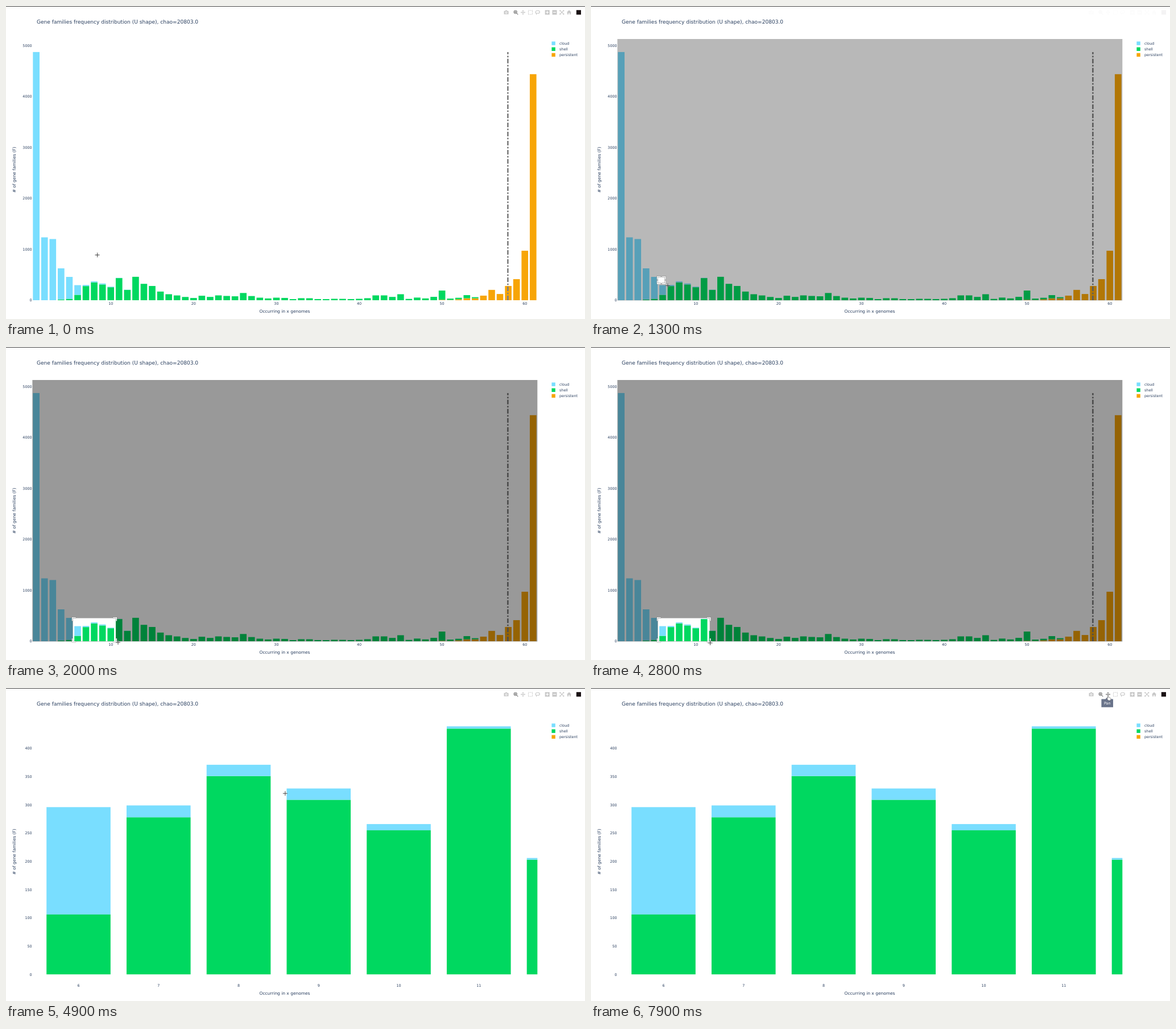
Write an HTML page with a canvas that moves like this. It is 1018 px wide and 550 px high and loops after 8000 ms.

```html
<!DOCTYPE html>
<html lang="en">
<head>
<meta charset="utf-8">
<title>Gene families frequency</title>
<style>
html, body { margin: 0; width: 100%; height: 100%; overflow: hidden; background: #fff; }
canvas { display: block; }
</style>
</head>
<body>
<canvas id="stage" width="1018" height="550"></canvas>
<script>
const ctx = document.getElementById('stage').getContext('2d');
const LOOP = 8000, STEP = 100;
const UNIT = 0.5335; // chart pixels to stage pixels
const INK = '#2a3f5f', SANS = '"DejaVu Sans", sans-serif', ARIAL = '"Liberation Sans", Arial, sans-serif';
const COLORS = { cloud: '#79deff', shell: '#00d860', persistent: '#f7a507' };
const PLOT = { l: 46.4, t: 58, r: 934.3, b: 517 };

const totals = [4875, 1235, 1202, 626, 458, 296, 299, 371, 329, 266, 439, 206, 460, 322, 280, 170,
  118, 94, 64, 44, 88, 65, 95, 84, 77, 142, 82, 50, 35, 50, 45, 22, 40, 39, 23, 22, 28, 27, 23, 28,
  40, 95, 95, 65, 118, 26, 52, 36, 66, 190, 32, 48, 100, 60, 90, 203, 122, 280, 414, 972, 4440];
const lowShell = [0, 0, 0, 15, 28, 106, 278, 351, 309, 255, 435, 203];
const lowPersistent = [8, 5, 18, 38, 38];

const bars = totals.map((total, i) => {
  const persistent = i < 49 ? 0 : lowPersistent[i - 49] ?? total;
  return { x: i + 1, persistent, total, shellTop: lowShell[i] ?? total };
});

const makeView = (x0, dx, y0, dy, xTicks, yTicks) =>
  ({ X: v => x0 + v * dx, Y: v => y0 - v * dy, dx, xTicks, yTicks });
const range = (from, to, step) => Array.from({ length: (to - from) / step + 1 }, (_, i) => from + i * step);
const fullView = makeView(38.6, 14.56, 517, 0.08946, range(10, 60, 10), range(0, 5000, 1000));
const zoomView = makeView(-717, 140.75, 503.2, 0.9928, range(6, 11, 1), range(0, 400, 50));

// Pointer path: time, x, y
const path = [
  [0, 160.5, 437.5], [600, 122.5, 477], [700, 122.5, 477], [1000, 118, 476.3], [1100, 118, 476.3],
  [1200, 123, 481], [1300, 135, 491.5], [1400, 146, 501], [2000, 197, 519], [2400, 204, 522],
  [2500, 204, 522], [2800, 209.5, 520], [3800, 209.5, 520], [4400, 428, 206], [4800, 428, 206],
  [5600, 931, 40], [5700, 925.5, 28.5], [6100, 920.5, 25.5], [6300, 920.5, 25.5],
  [7100, 878, 16], [7500, 878, 16], [7900, 909.5, 14]
];
function pointerAt(t) {
  const i = path.findIndex(p => p[0] > t);
  if (i < 0) return path.at(-1).slice(1);
  const [t0, x0, y0] = path[i - 1], [t1, x1, y1] = path[i], k = (t - t0) / (t1 - t0);
  return [x0 + (x1 - x0) * k, y0 + (y1 - y0) * k];
}

function text(str, x, y, size, align = 'left', color = INK, font = SANS) {
  ctx.font = `${size}px ${font}`;
  ctx.textAlign = align;
  ctx.fillStyle = color;
  ctx.fillText(str, x, y);
}
function rect(x, y, w, h, color) {
  ctx.fillStyle = color;
  ctx.fillRect(x, y, w, h);
}
function shape(d, fill, stroke, width = 1) {
  const p = new Path2D(d);
  ctx.lineWidth = width;
  if (stroke) { ctx.strokeStyle = stroke; ctx.stroke(p); }
  if (fill) { ctx.fillStyle = fill; ctx.fill(p, 'evenodd'); }
}
function at(x, y, draw) {
  ctx.save();
  ctx.translate(x, y);
  draw();
  ctx.restore();
}

function drawFrame(view) {
  rect(0, 0, 1018, 550, '#fff');
  rect(0, 0, 1018, 1, '#444');
  text('Gene families frequency distribution (U shape), chao=20803.0', 54, 31.2, 17 * UNIT);
  text('Occurring in x genomes', 490, 539.3, 14 * UNIT, 'center');
  at(16.6, 287.7, () => {
    ctx.rotate(-Math.PI / 2);
    text('# of gene families (F)', 0, 0, 14 * UNIT, 'center');
  });
  for (const v of view.xTicks) text(v, view.X(v), 525.2, 12 * UNIT, 'center');
  for (const v of view.yTicks) text(v, 45.6, view.Y(v) + 2.3, 12 * UNIT, 'right');
  Object.entries(COLORS).forEach(([name, color], i) => {
    const y = 65.6 + i * 10.15;
    rect(959.4, y - 3.2, 6.4, 6.4, color);
    text(name, 973, y + 2.3, 12 * UNIT);
  });
}

function drawBars(view) {
  const { X, Y, dx } = view, w = dx * 0.8;
  ctx.save();
  ctx.beginPath();
  ctx.rect(PLOT.l, PLOT.t, PLOT.r - PLOT.l, PLOT.b - PLOT.t);
  ctx.clip();
  for (const b of bars) {
    const part = (from, to, color) => to > from && rect(X(b.x) - w / 2, Y(to), w, Y(from) - Y(to), color);
    part(0, b.persistent, COLORS.persistent);
    part(b.persistent, b.shellTop, COLORS.shell);
    part(b.shellTop, b.total, COLORS.cloud);
  }
  const lw = 5 * UNIT;
  ctx.setLineDash([3 * lw, lw, lw, lw]);
  ctx.strokeStyle = '#808080';
  ctx.lineWidth = lw;
  ctx.beginPath();
  ctx.moveTo(X(57.95), Y(0));
  ctx.lineTo(X(57.95), Y(4875));
  ctx.stroke();
  ctx.restore();
}

function drawSelection(t) {
  const l = 117.7, top = 476.5;
  const [px, py] = pointerAt(t - 45);
  const r = Math.max(px, l + 2), b = Math.min(Math.max(py, top + 2), PLOT.b);
  ctx.beginPath();
  ctx.rect(PLOT.l, PLOT.t, PLOT.r - PLOT.l, PLOT.b - PLOT.t + 0.4);
  ctx.rect(l, top, r - l, b - top);
  ctx.fillStyle = `rgba(0,0,0,${Math.min(0.4, (t - 1160) / 500)})`;
  ctx.fill('evenodd');
  const arm = Math.min(20, (r - l) / UNIT, (b - top) / UNIT) / 2;
  for (const [x, y, sx, sy] of [[l, top, 1, 1], [r, top, -1, 1], [l, b, 1, -1], [r, b, -1, -1]]) {
    at(x, y, () => {
      ctx.scale(sx * UNIT, sy * UNIT);
      shape(`M-3.5 ${arm - 0.5}h3v${-arm}h${arm}v-3h${-arm - 3}z`, '#fff', '#444');
    });
  }
}

function drawHover(t, x, y) {
  const { X, Y, dx } = zoomView;
  const b = bars[t < 3900 ? 5 : Math.round((x - X(0)) / dx) - 1];
  if (!b) return;
  const away = Math.abs(x - X(b.x)) > dx * 0.4 || y < Y(b.total) || y > PLOT.b || x > PLOT.r;
  if (t >= 3900 && away) return;
  const name = t < 3900 || y > Y(b.shellTop) ? 'shell' : 'cloud';
  const value = name === 'shell' ? b.shellTop : b.total;
  const label = `(${b.x}, ${value})`, size = 13 * UNIT, pad = 3 * UNIT, arrow = 6 * UNIT;
  at(X(b.x) + dx * 0.4, Y(value), () => {
    ctx.font = `${size}px ${ARIAL}`;
    const w = ctx.measureText(label).width + 2 * pad, nw = ctx.measureText(name).width + 2 * pad;
    rect(arrow + w, -6, nw, 12, name === 'shell' ? '#ccf7df' : '#e4f8ff');
    shape(`M0 0L${arrow} -3.2V-6h${w}v12h${-w}v-2.8z`, COLORS[name], '#444', 0.8);
    text(label, arrow + pad, 2.4, size, 'left', '#444', ARIAL);
    text(name, arrow + w + pad, 2.4, size, 'left', COLORS[name], ARIAL);
  });
}

// Toolbar icons: x, filled path, stroked path, dash
const icons = [
  [879.5, 'M-4-2.4h2l1-1.2h2l1 1.2h2v5.6h-8zM0-1.6a2 2 0 100 4a2 2 0 100-4zM0-.7a1.1 1.1 0 100 2.2a1.1 1.1 0 100-2.2z'],
  [896.3, '', 'M2-.6a2.6 2.6 0 11-5.2 0a2.6 2.6 0 115.2 0zM1.4 1.4L4 4M-2-.6h2.8M-.6-2v2.8'],
  [909, 'M0-4.2l1.6 1.7h-3.2zM0 4.2l1.6-1.7h-3.2zM-4.2 0l1.7-1.6v3.2zM4.2 0l-1.7-1.6v3.2z', 'M-3 0h6M0-3v6'],
  [922, '', 'M-3.5-3.5h7v7h-7z', [1.6, 1.2]],
  [934.7, '', 'M-1.8 1.8C-5 .8-4-3.2 0-3.2S5 .6 1.2 1.6C-.5 2-1.5 1-2.3 2c-.5 1 .6 1 .2 2.2'],
  [951.7, 'M-4-4h8v8h-8zM-.6-2.5h1.2v1.9h1.9v1.2h-1.9v1.9h-1.2v-1.9h-1.9v-1.2h1.9z'],
  [964.5, 'M-4-4h8v8h-8zM-2.5-.6h5v1.2h-5z'],
  [977.3, 'M-4-4h2.6l-2.6 2.6zM4-4v2.6l-2.6-2.6zM-4 4v-2.6l2.6 2.6zM4 4h-2.6l2.6-2.6z', 'M-3-3L3 3M3-3L-3 3'],
  [990, 'M0-4L4.2 0H3v3.6H.9V1H-.9v2.6H-3V0H-4.2z']
];
const tips = { 1: 'Zoom', 2: 'Pan' };

function drawToolbar(opacity, hovered) {
  ctx.save();
  ctx.globalAlpha = opacity;
  icons.forEach(([x, fill, stroke, dash], i) => at(x, 11.2, () => {
    const color = i === 1 || i === hovered ? '#7c7c7c' : '#c7c7c7';
    if (dash) ctx.setLineDash(dash);
    if (stroke) shape(stroke, null, color, 1.1);
    if (fill) shape(fill, color);
  }));
  rect(1002.8, 7.2, 8.2, 8, '#1a1214');
  ctx.restore();
  if (tips[hovered]) at(icons[hovered][0] - 1.3, 19.4, () => {
    ctx.font = `${12 * UNIT}px ${SANS}`;
    const w = ctx.measureText(tips[hovered]).width + 17 * UNIT;
    shape(`M-3.2 0L0-3.2L3.2 0H${w / 2}v14.4h${-w}v-14.4z`, '#69738a');
    text(tips[hovered], 0, 9.4, 12 * UNIT, 'center', '#fff');
  });
}

const cursors = {
  cross() {
    shape('M-4 0h8M0-4v8', null, 'rgba(255,255,255,.45)', 2);
    shape('M-4 0h8M0-4v8', null, '#333', 0.9);
  },
  resize() { shape('M-4 0l2.6-2.4v1.7h2.8v-1.7L4 0l-2.6 2.4v-1.7h-2.8v1.7z', '#000', '#fff', 0.6); },
  arrow() { shape('M0 0v6.3l1.5-1.3l1.1 2.4l1.1-.5l-1.1-2.4h2z', '#000', '#fff', 0.8); },
  hand() {
    shape('M-1 .4q.7-.8 1.3 0v2.4l3 .7q1.3.4 1 1.8l-.6 2.4h-3.4l-2.7-3q.3-1 1.4-.1z', '#fff', '#333', 1);
  }
};

function render(now) {
  const t = Math.floor(now % LOOP / STEP) * STEP;
  const [x, y] = pointerAt(t);
  const zoomed = t >= 3400, dragging = t >= 1200 && !zoomed;
  const view = zoomed ? zoomView : fullView;
  const hovered = t >= 7600 ? icons.findIndex(icon => Math.abs(icon[0] - x) < 5.5) : -1;
  const fade = zoomed ? (t - 3300) / 200 : 1 - (t - 1100) / 210;

  drawFrame(view);
  drawBars(view);
  if (dragging) drawSelection(t);
  if (zoomed) drawHover(t, x, y);
  drawToolbar(Math.max(0, Math.min(1, fade)), hovered);
  const kind = hovered >= 0 ? 'hand' : y < PLOT.t ? 'arrow' : zoomed && y > PLOT.b ? 'resize' : 'cross';
  at(x, y, cursors[kind]);
}

function loop() {
  render(performance.now());
  requestAnimationFrame(loop);
}
loop();
</script>
</body>
</html>
```
